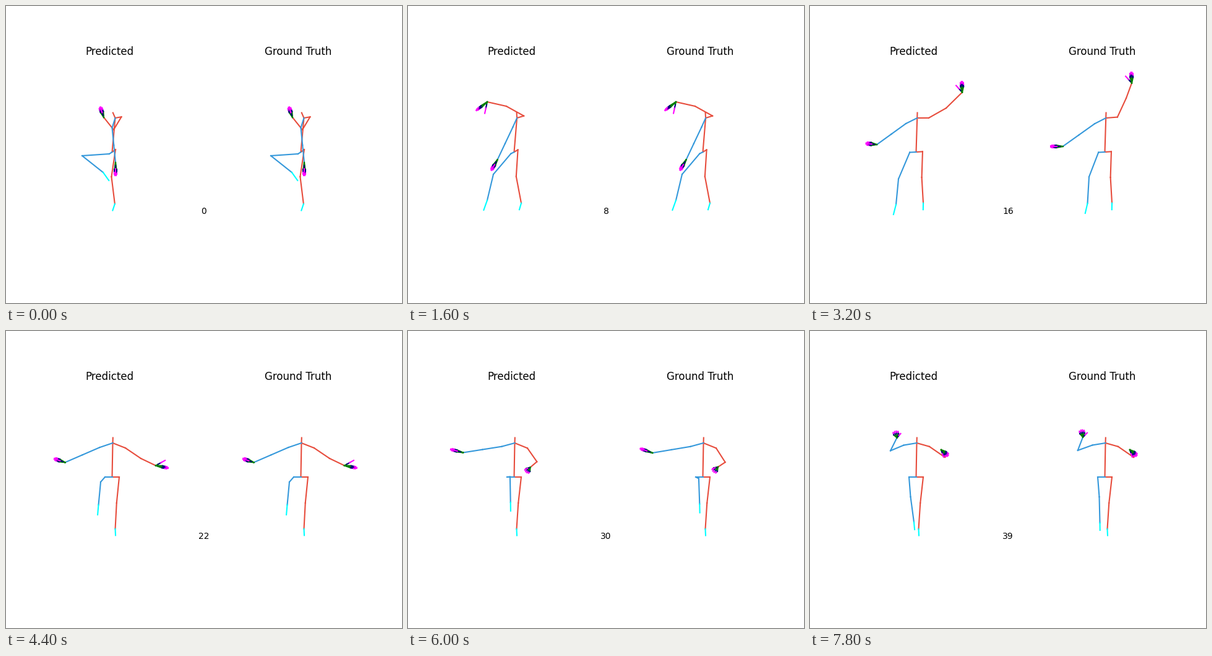
Recreate the animation shown at these times as a matplotlib script. Size 640 px wide and 480 px high, loop 8 s.

```python
import numpy as np
import matplotlib.pyplot as plt
from matplotlib.animation import FuncAnimation
from matplotlib.collections import LineCollection

W, H, DPI = 640, 480, 100
FRAMES, STEP_MS = 40, 200
PANEL_GAP = 305
RED, BLUE = "#e74c3c", "#3498db"
HAND_COLOURS = ("green", "navy", "magenta")
PELVIS = np.array([171.5, 236])


def path(*keys):
    """Monotone cubic through (frame, values...) keys, sampled per frame."""
    keys = np.array(keys, float)
    t, v = keys[:, 0], keys[:, 1:]
    d = np.diff(v, axis=0) / np.diff(t)[:, None]
    a, b = d[:-1], d[1:]
    same = a * b > 0
    m = np.vstack([d[:1], np.zeros_like(a), d[-1:]])
    m[1:-1][same] = 2 * a[same] * b[same] / (a + b)[same]
    f = np.arange(FRAMES)
    i = np.clip(np.searchsorted(t, f, side="right") - 1, 0, len(t) - 2)
    h = (t[i + 1] - t[i])[:, None]
    s = (f - t[i])[:, None] / h
    return ((1 + 2 * s) * (1 - s) ** 2 * v[i] + s * (1 - s) ** 2 * h * m[i]
            + s * s * (3 - 2 * s) * v[i + 1] + s * s * (s - 1) * h * m[i + 1])


def ease(f, start, end):
    s = np.clip((f - start) / (end - start), 0, 1)
    return s * s * (3 - 2 * s)


def bump(f, centre, width):
    return np.exp(-((f - centre) / width) ** 2)


def mix(a, b, s):
    return np.array(a) + (np.array(b) - a) * s


def polar(degrees, length):
    a = np.radians(degrees)
    return length * np.array([np.cos(a), np.sin(a)])


# Key points of the free joints; hands are wrist x, y, angle and length.
motion = {
    "r_elbow": path((0, 174, 200), (8, 159, 162), (12, 178, 150),
                    (16, 220, 165), (22, 218, 206), (26, 202, 216),
                    (33, 214, 207), (39, 218, 204)),
    "r_hand": path((0, 158, 180, 251, 18), (8, 128, 155, 142, 23),
                   (12, 155, 130, 260, 18), (16, 246, 139.5, 268, 18),
                   (19, 257, 178, 330, 20), (22, 242, 217.5, 371, 21),
                   (26, 196, 221.5, 456, 9), (33, 200, 218.5, 500, 12),
                   (39, 212, 192, 402, 15)),
    "l_hand": path((0, 177, 253, 90, 22), (8, 144.5, 248.5, 120, 20),
                   (16, 108, 224, 186, 18), (26, 91, 205, 202, 20),
                   (33, 88.5, 189.5, 190, 22), (39, 140.5, 172.5, 257, 11)),
    "l_knee": path((0, 123, 242), (8, 138, 272), (16, 143, 279.5),
                   (22, 153, 244), (26, 164.5, 220.5), (33, 165, 251),
                   (39, 162.5, 268)),
    "l_ankle": path((0, 157, 269), (8, 128, 314), (16, 139, 321),
                    (22, 149.5, 281), (26, 164, 262), (33, 166.5, 292),
                    (39, 168, 309)),
}

# Where the true motion departs from the prediction: joint, frame, offset.
drift = (
    ("r_elbow", 16, (-14, -16)),
    ("r_hand", 16, (-31, -15, 0, 0)),
    ("r_elbow", 33, (-3, 3.5)),
    ("r_hand", 33, (-7, -2.5, 15, 2)),
    ("l_hand", 16, (-4.5, 3, -6, 2)),
    ("l_hand", 33, (4.5, 2, 20, 0)),
    ("l_hand", 39, (-4.5, -1, 3, 1)),
    ("l_knee", 16, (3, -3.5)),
    ("l_ankle", 16, (4.5, -2)),
    ("l_knee", 33, (0, 12)),
    ("l_ankle", 33, (2.5, 12)),
    ("l_ankle", 39, (-4.5, 1)),
)
true_motion = {name: track.copy() for name, track in motion.items()}
for name, centre, offset in drift:
    weight = bump(np.arange(FRAMES), centre, 2.5)
    true_motion[name] += weight[:, None] * np.array(offset)


def chain(points, colours):
    return list(zip(points[:-1], points[1:], colours))


def hand(pose, thumb_turn, openness=1):
    """Four fanned fingers and a thumb; a foreshortened hand fans wider."""
    wrist, (angle, length) = pose[:2], pose[2:]
    tip = polar(angle, length)
    fan = min(13 - 0.45 * length, 0.75 * length) * openness
    bones = []
    for k in (-0.5, -0.17, 0.17, 0.5):
        side = polar(angle + 90, fan * k)
        reach = 1 - 0.3 * abs(k)
        joints = [wrist] + [wrist + tip * p * reach + side
                            for p in (0.6, 0.85, 1.02)]
        bones += chain(joints, HAND_COLOURS)
    thumb = polar(angle + thumb_turn, 0.82 * length)
    joints = [wrist + thumb * p for p in (0, 0.25, 0.55, 1)]
    return bones + chain(joints, HAND_COLOURS)


def skeleton(tracks, f):
    pose = {name: track[f] for name, track in tracks.items()}
    r_wrist, l_wrist = pose["r_hand"][:2], pose["l_hand"][:2]
    l_knee, l_ankle = pose["l_knee"], pose["l_ankle"]
    turn = ease(f, 5, 20)    # side view to front view
    fold = ease(f, 31, 39)   # left elbow bends
    step = bump(f, 12, 6.5)  # forward stride

    neck = np.array([176.5 - 4 * turn, 181])
    head = neck + (0.3 - 4 * max(0, 1 - f / 10), -8.5)

    # Shoulders rise and sink with the hands.
    r_shoulder = neck + mix((10, 0), (20.5, 6.5), turn)
    l_shoulder = neck + mix((-5, 11), (-21, 6), turn)
    r_shoulder[1] += 0.09 * (r_wrist[1] - 200)
    l_shoulder[1] += 0.09 * (l_wrist[1] - 200)
    l_elbow = (l_shoulder + l_wrist) / 2 + fold * np.array([-16, 15])

    r_hip = mix((177, 232), (183, 236), turn)
    l_hip = mix((167, 239), (160, 236), turn)
    r_ankle = np.array([175.5 + 11 * step, 320 - 2 * step])
    r_knee = (r_hip + r_ankle) / 2 - (1 + 5 * (1 - turn), 0)
    r_toe = r_ankle + (4 * turn - 3.5, 10.5)
    shin = l_ankle - l_knee + (0, 20)
    foot = 16 - 4 * ease(f, 27, 33)
    l_toe = l_ankle + shin / np.hypot(*shin) * foot - (4.5 * step, 0)

    leg_colours = lambda c: [c] * 3 + ["cyan"]
    bones = chain([PELVIS, neck, head], [RED] * 2)
    bones += chain([PELVIS, r_hip, r_knee, r_ankle, r_toe], leg_colours(RED))
    bones += chain([neck, r_shoulder, pose["r_elbow"], r_wrist], [RED] * 3)
    bones += chain([PELVIS, l_hip, l_knee, l_ankle, l_toe], leg_colours(BLUE))
    bones += chain([neck, l_shoulder, l_elbow, l_wrist], [BLUE] * 3)

    thumb_turn = -40 * ease(f, 0, 8) + 70 * ease(f, 23, 28)
    bones += hand(pose["r_hand"], thumb_turn, 1 - 0.8 * bump(f, 26, 2))
    return bones + hand(pose["l_hand"], 55 * fold)


fig = plt.figure(figsize=(W / DPI, H / DPI), dpi=DPI, facecolor="white")
ax = fig.add_axes([0, 0, 1, 1])
ax.set_xlim(0, W)
ax.set_ylim(H, 0)
ax.axis("off")

for x, title in ((167.3, "Predicted"), (472, "Ground Truth")):
    ax.text(x, 79, title, fontsize=12, ha="center", va="baseline")
counter = ax.text(W / 2, 336, "0", fontsize=10, ha="center", va="baseline")

panels = []
for tracks, dx in ((motion, 0), (true_motion, PANEL_GAP)):
    lines = LineCollection([], linewidths=1.5, capstyle="projecting")
    ax.add_collection(lines, autolim=False)
    panels.append((lines, tracks, np.array([dx, 0])))


def draw(f):
    for lines, tracks, shift in panels:
        bones = skeleton(tracks, f)
        lines.set_segments([(a + shift, b + shift) for a, b, _ in bones])
        lines.set_color([c for *_, c in bones])
    counter.set_text(str(f))
    return [p[0] for p in panels] + [counter]


anim = FuncAnimation(fig, draw, frames=FRAMES, interval=STEP_MS, repeat=True,
                     repeat_delay=0)
plt.show()
```
